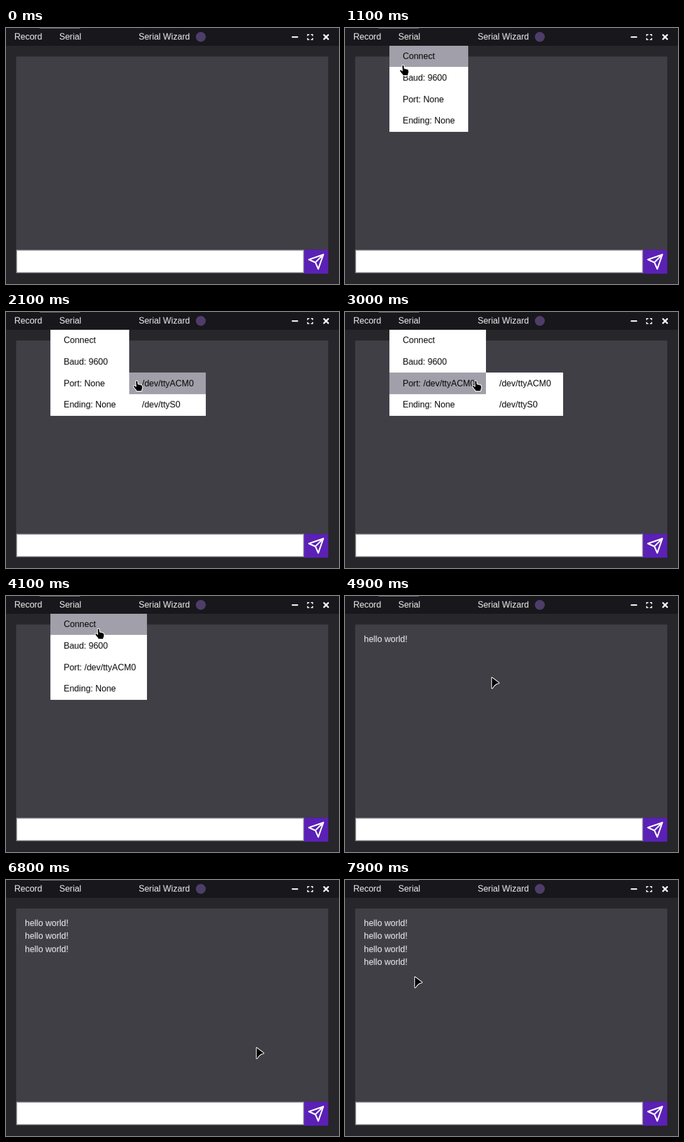
An HTML page for the animation above (8 s loop, 600 by 461 pixels).

```html
<!DOCTYPE html>
<html lang="en">
<head>
<meta charset="utf-8">
<title>Serial Wizard</title>
<style>
html, body { margin: 0; width: 100%; height: 100%; overflow: hidden; background: #27262a; }
#stage { position: relative; width: 600px; height: 461px; overflow: hidden; background: #27262a;
  font: 16px/24px "Liberation Sans", Arial, sans-serif; color: #f4f4f5; }
#stage > * { position: absolute; }
.text { position: absolute; white-space: pre; transform: translateY(-50%) scale(.97);
  transform-origin: 0 50%; will-change: transform; }
svg { left: 0; top: 0; }
.menu { background: #fff; color: #000; }
.row { position: relative; height: 38.75px; }
.row .text { left: 23.8px; top: 50%; }
.hot { background: #a1a0aa; }
</style>
</head>
<body>
<div id="stage">
  <svg width="600" height="461" fill="none" stroke="#fff">
    <g stroke="none">
      <rect width="600" height="32" fill="#18171b"/>
      <rect x="60" y="-2" width="74" height="3" rx="2" fill="#77767b"/>
      <circle cx="351" cy="16" r="9" fill="#4d3d68"/>
      <rect x="18.4" y="51.4" width="562.2" height="348" fill="#403f46"/>
      <rect x="18.4" y="399.3" width="518.6" height="42" fill="#97969b"/>
      <rect x="20.1" y="401" width="515.2" height="38.6" fill="#fff"/>
      <rect x="537" y="399.3" width="43.6" height="43.2" fill="#5b21b6"/>
    </g>
    <path d="M516 16.3H525.2" stroke-width="2.4" stroke-linecap="round"/>
    <path d="M543.5 14.5V11.8H546.5M549.5 11.8H552.5V14.5M552.5 18V20.8H549.5M546.5 20.8H543.5V18" stroke-width="1.7"/>
    <path d="M573 12.5L580.5 20M580.5 12.5L573 20" stroke-width="3" stroke-linecap="round"/>
    <path transform="translate(543.2 405.3) scale(1.3)" d="M22 2L11 13M22 2L15 22L11 13L2 9Z"
      stroke-width="2" stroke-linecap="round" stroke-linejoin="round"/>
  </svg>
  <span class="text" style="left:14.6px;top:16px">Record</span>
  <span class="text" style="left:96px;top:16px">Serial</span>
  <span class="text" style="left:238.7px;top:16px">Serial Wizard</span>
  <div id="log"></div>
  <div id="menu" class="menu"></div>
  <div id="bauds" class="menu" style="width:99px"></div>
  <div id="ports" class="menu" style="width:138.5px"></div>
  <svg width="600" height="461" stroke="#fff" stroke-width="1.2" stroke-linejoin="round">
    <g id="cursor">
      <path id="arrow" d="M0 1.2Q0 0 1.2.8L13.2 9.8Q14.5 11.2 12.6 11.7Q6.5 12.5 2 20Q0 21.8 0 19.5Z"/>
      <path id="hand" d="M-1.8 1.8Q-1.8 0 0 0Q1.8 0 1.9 1.8L2.4 6.2L7.5 7.2Q10.4 7.8 10.4 10.5V13Q10.4 15 9.2 16.8V19H-.8V17.2Q-3.5 15-5.6 11.2Q-6.4 9.2-5 8.7Q-3.6 8.4-1.2 10.6Z"/>
    </g>
  </svg>
</div>
<script>
const $ = id => document.getElementById(id);
const LOOP = 8000, STEP = 100;
const OPEN = 1000, PICK = 2600, CONNECTED = 4600, CLOSE = 4900, FIRST_LINE = 4800;
const LEFT = 80, TOP = 31.7, ROW = 38.75;
const rowTop = i => TOP + i * ROW;

function addText(parent, label) {
  const span = document.createElement('span');
  span.className = 'text';
  span.textContent = label;
  parent.append(span);
  return span;
}

function addRows(menu, firstRow, labels) {
  menu.style.top = rowTop(firstRow) + 'px';
  return labels.map(label => {
    const row = document.createElement('div');
    row.className = 'row';
    menu.append(row);
    return { row, text: addText(row, label) };
  });
}

const items = addRows($('menu'), 0, ['Connect', 'Baud: 9600', 'Port: None', 'Ending: None']);
const ports = addRows($('ports'), 2, ['/dev/ttyACM0', '/dev/ttyS0']);
addRows($('bauds'), 1, Array.from({ length: 10 }, (_, i) => 300 << i));
$('menu').style.left = LEFT + 'px';

const lines = Array.from({ length: 4 }, (_, i) => {
  const line = addText($('log'), 'hello world!');
  line.style.left = '34px';
  line.style.top = 78 + i * 23.27 + 'px';
  return line;
});

const show = (el, on) => { el.style.visibility = on ? 'visible' : 'hidden'; };

// Pointer tip: glides between a few places and rests in between.
function pointerAt(t) {
  let x = 330, y = 424;
  const glide = (start, end, toX, toY) => {
    const k = Math.min(1, Math.max(0, (t - start) / (end - start)));
    x += (toX - x) * k;
    y += (toY - y) * k;
  };
  glide(100, OPEN, 106, 20);
  glide(OPEN, 1100, 104, 66);
  glide(1100, 1500, 136, 126);
  glide(1500, 1900, 235, 123);
  glide(3100, 3600, 166, 58);
  glide(FIRST_LINE, 5100, 459, 320);
  glide(5100, 5400, 575, 332);
  glide(6700, 6900, 326, 269);
  glide(7700, 7900, 125, 173);
  return { x, y };
}

function render(t) {
  const { x, y } = pointerAt(t);
  const open = t >= OPEN && t < CLOSE;
  const picked = t >= PICK;
  const width = picked ? 174 : 141.5;
  const right = LEFT + width;
  const inPorts = open && x > right;
  const hot = inPorts ? -1 : Math.floor((y - TOP) / ROW);

  show($('menu'), open);
  show($('bauds'), open && hot === 1);
  show($('ports'), open && (hot === 2 || inPorts));
  $('menu').style.width = width + 'px';
  $('bauds').style.left = $('ports').style.left = right + 'px';

  items.forEach(({ row }, i) => row.classList.toggle('hot', i === hot));
  ports[0].row.classList.toggle('hot', inPorts);
  items[0].text.textContent = t >= CONNECTED ? 'Disconnect' : 'Connect';
  items[2].text.textContent = picked ? 'Port: /dev/ttyACM0' : 'Port: None';
  lines.forEach((line, i) => show(line, t >= FIRST_LINE + i * 1000));

  const pointing = t >= OPEN - STEP && t < CLOSE;
  show($('hand'), pointing);
  show($('arrow'), !pointing && t >= STEP);
  $('cursor').setAttribute('transform', `translate(${x + .5} ${y + .6})`);
}

function tick() {
  const t = performance.now() % LOOP;
  render(Math.floor(t / STEP) * STEP);
  requestAnimationFrame(tick);
}
tick();
</script>
</body>
</html>
```
